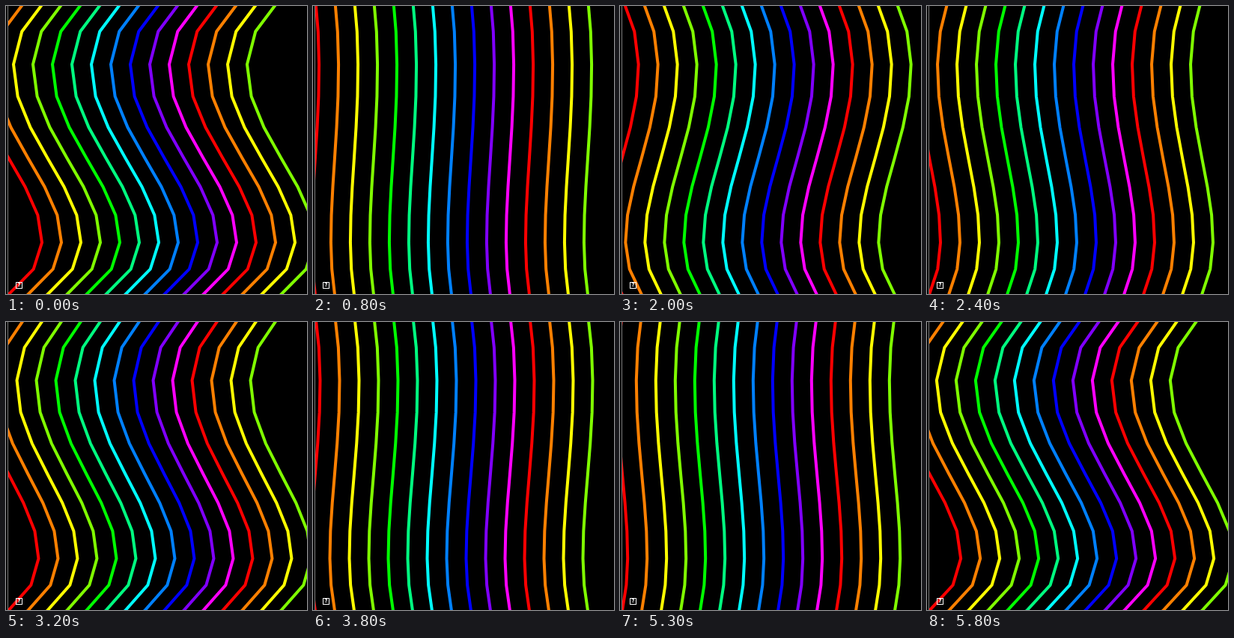
Write an HTML page with a canvas that moves like this. It is 402x384 px and loops after 5.9 s.

```html
<!DOCTYPE html>
<html lang="en">
<head>
<meta charset="utf-8">
<title>Swaying rainbow lines</title>
<style>
  html, body { margin: 0; width: 100%; height: 100%; overflow: hidden; background: #000; }
  canvas { position: absolute; left: 0; top: 0; display: block; }
  .edge { position: absolute; left: 2px; top: 0; width: 1px; height: 384px; background: #808080; }
  .badge {
    position: absolute; left: 13px; top: 368px; width: 9px; height: 9px;
    box-sizing: border-box; border: 1px solid #fff; color: #fff;
    font: bold 7px/7px "DejaVu Sans", sans-serif; text-align: center;
  }
</style>
</head>
<body>
<canvas width="402" height="384"></canvas>
<div class="edge"></div>
<div class="badge">?</div>
<script>
const ctx = document.querySelector('canvas').getContext('2d');
const LOOP = 5900, PERIOD = 2985, SWAY = 45;
const LINES = 15, GAP = 26, LEFT = 3, HUES = 11;

// Even 100 ms steps at first, then an uneven rhythm.
const steps = Array.from({ length: 25 }, (_, i) => i * 100).concat(
  [28, 29, 30, 32, 34, 35, 37, 38, 40, 41, 43, 45, 46, 48, 50, 51, 53, 55, 56, 58].map(n => n * 100));

const rowY = r => 202 + 39.6 * r - 0.6 * r * r;
const bend = r => r * (25 - r * r) / 48;

function draw(time) {
  const sway = SWAY * Math.cos(2 * Math.PI * time / PERIOD);
  ctx.fillStyle = '#000';
  ctx.fillRect(0, 0, 402, 384);
  ctx.save();
  ctx.beginPath();
  ctx.rect(LEFT, 0, 399, 384);
  ctx.clip();
  ctx.lineWidth = 4;
  for (let i = 0; i < LINES; i++) {
    ctx.strokeStyle = `hsl(${i % HUES * 30}, 100%, 50%)`;
    ctx.beginPath();
    for (let r = -6; r <= 6; r++) ctx.lineTo(LEFT + i * GAP + sway * bend(r), rowY(r));
    ctx.stroke();
  }
  ctx.restore();
}

let shown = -1;
function tick() {
  const now = performance.now() % LOOP;
  const step = steps.filter(s => s <= now).pop();
  if (step !== shown) draw(shown = step);
  requestAnimationFrame(tick);
}
tick();
</script>
</body>
</html>
```
